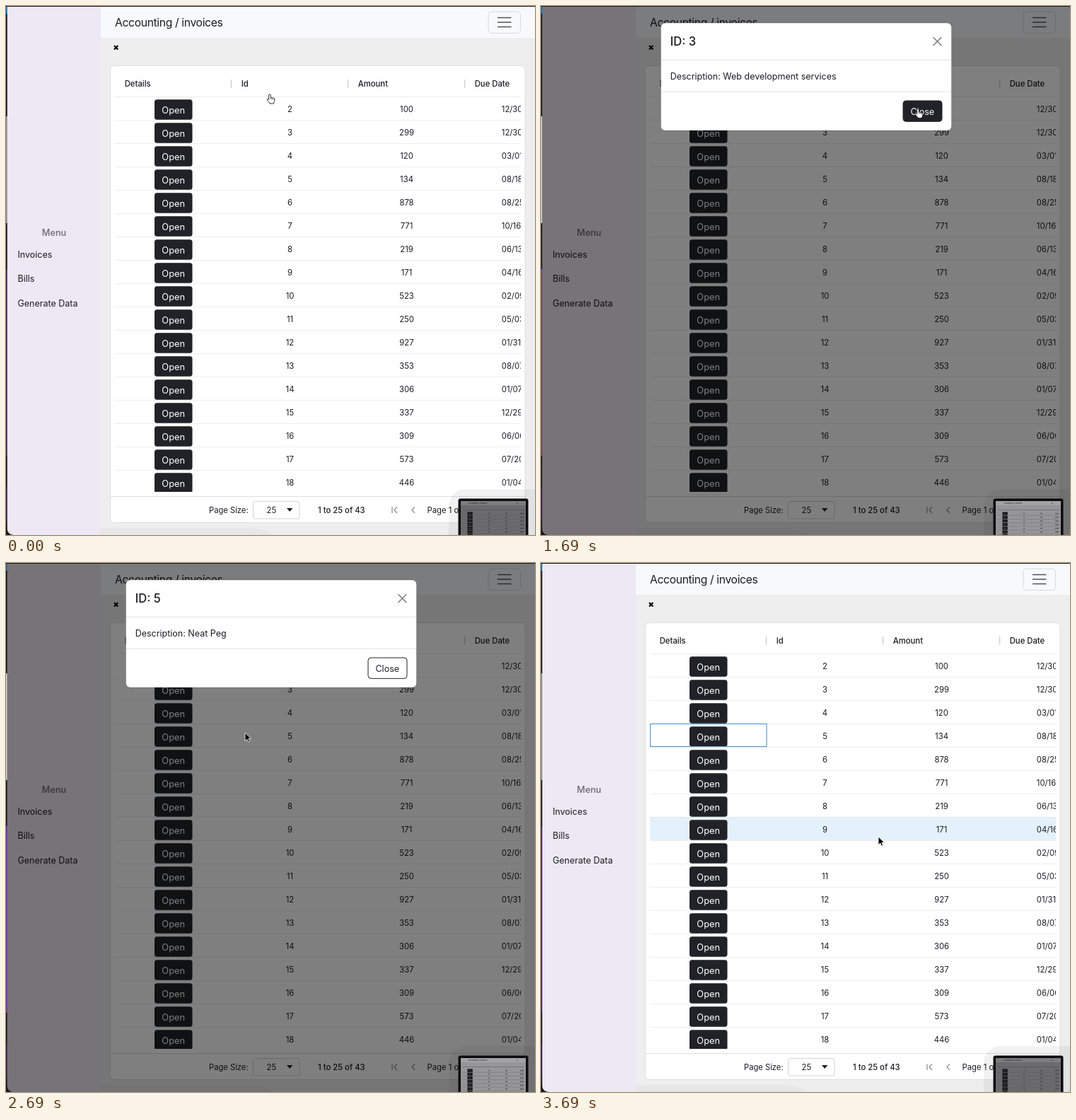
An HTML page for the animation above (3.89 s loop, 748x748 px).

```html
<!DOCTYPE html>
<html lang="en">
<head>
<meta charset="utf-8">
<title>Invoices</title>
<style>
  html, body { margin: 0; width: 100%; height: 100%; overflow: hidden; background: #17171c; }
  svg { display: block; width: 100vw; height: 100vh; font-family: Inter, Roboto, sans-serif; }
</style>
</head>
<body>
<svg id="stage" viewBox="0 0 748 748" xmlns="http://www.w3.org/2000/svg"></svg>
<script>
const LOOP = 3890, TOP = 128, ROW = 33, INK = '#212227';
const $ = id => document.getElementById(id);

const amounts = '100 299 120 134 878 771 219 171 523 250 927 353 306 337 309 573 446'.split(' ');
const dates = '12/30 12/30 03/01 08/18 08/25 10/16 06/13 04/16 02/09 05/03 01/31 08/07 01/07 12/29 06/06 07/20 01/04'.split(' ');

// at: start time, x/y: pointer tip, row/btn/focus: grid row index,
// fade: backdrop and dialog strength, top: dialog offset
const steps = [
  { at: 0, x: 373, y: 125, hand: 1 },
  { at: 100, x: 318, y: 147, row: 0 },
  { at: 290, x: 245, y: 182, hand: 1, row: 1, btn: 1 },
  { at: 490, x: 236, y: 181, hand: 1, row: 1, btn: 1 },
  { at: 690, x: 236, y: 181, hand: 1, row: 1, btn: 1, focus: 1 },
  { at: 890, x: 236, y: 181, hand: 1, row: 1, fade: 1, top: 20, id: 3 },
  { at: 1090, x: 306, y: 182, fade: 1, top: 24, id: 3 },
  { at: 1290, x: 495, y: 154, fade: 1, top: 24, id: 3 },
  { at: 1490, x: 531, y: 146.5, hand: 1, fade: 1, top: 24, id: 3, close: 1 },
  { at: 1690, x: 533, y: 145.5, hand: 1, fade: 1, top: 24, id: 3, close: 1 },
  { at: 1890, x: 533, y: 146, hand: 1, fade: .5, top: 12, id: 3, close: 1 },
  { at: 2090, x: 330, y: 210, row: 2, focus: 1 },
  { at: 2290, x: 248, y: 244.5, hand: 1, row: 3, btn: 3, focus: 3 },
  { at: 2490, x: 247.5, y: 244, row: 3, btn: 3, fade: .7, top: 5, id: 5 },
  { at: 2690, x: 338, y: 240, fade: 1, top: 24, id: 5 },
  { at: 2890, x: 592, y: 152, fade: 1, top: 24, id: 5 },
  { at: 3090, x: 566, y: 144, fade: 1, top: 24, id: 5 },
  { at: 3290, x: 553, y: 146, hand: 1, fade: 1, top: 24, id: 5, close: 1 },
  { at: 3490, x: 553, y: 147, hand: 1, fade: .5, top: 12, id: 5, close: 1 },
  { at: 3690, x: 477, y: 387, row: 7, focus: 3 }
];
const notes = { 3: 'Web development services', 5: 'Neat Peg' };

const rect = (x, y, w, h, fill, more = '') =>
  `<rect x="${x}" y="${y}" width="${w}" height="${h}" fill="${fill}" ${more}/>`;
const path = (d, stroke, width = 1, more = '') =>
  `<path d="${d}" fill="none" stroke="${stroke}" stroke-width="${width}" ${more}/>`;
// y is the middle of the capitals
const text = (x, y, size, str, more = '') =>
  `<text x="${x}" y="${y + size * .365}" font-size="${size}" fill="#1c1d20" ${more}>${str}</text>`;
const MID = 'text-anchor="middle"', MEDIUM = 'font-weight="500"';

function backdropStrip() {
  return rect(0, 0, 748, 748, '#17171c')
    + rect(0, 1, 2, 10, '#1b6fae')
    + rect(0, 156, 3, 151, '#8f8f93', 'id="stripGrey"')
    + rect(0, 372, 3, 264, '#452060', 'id="stripPurple"')
    + rect(0, 680, 3, 48, '#35194a');
}

function shell() {
  return rect(134, 1, 614, 747, '#eeeeee')
    + rect(134, 1, 614, 44, '#f8f9fc')
    + rect(1.5, 1, 132.5, 747, '#ede8f4')
    + '<path d="M134 738H345Q368 739 376 748H134Z" fill="#e7e7e7"/>'
    + text(68, 320, 12.7, 'Menu', MID + ' style="fill:#6d6a73" ' + MEDIUM)
    + ['Invoices', 'Bills', 'Generate Data']
        .map((s, i) => text(16.5, 351.3 + 34.6 * i, 12.5, s)).join('')
    + text(154, 23, 15.7, 'Accounting / invoices', 'letter-spacing="-.36"')
    + rect(682, 8, 45.5, 30.5, 'none', 'rx="5" stroke="#d6d8db"')
    + path('M695 16.5H714.5M695 23H714.5M695 29.5H714.5', '#535457', 1.5)
    + path('M153 56L158.4 61.4M158.4 56L153 61.4', '#000', 2.1);
}

function gridRow(i) {
  const y = TOP + ROW * i, c = y + 18;
  return rect(154, y + .5, 574, ROW, '#fff', `id="row${i}"`)
    + path(`M154 ${y + ROW + .5}H728`, '#dcdddf')
    + rect(210, y + 4.3, 53.5, 28.4, INK, `rx="3.5" id="btn${i}"`)
    + text(236.7, c + 1, 12.8, 'Open', MID + ' style="fill:#fff"')
    + text(401.5, c + .2, 11.3, i + 2, MID)
    + text(566.5, c + .2, 11.3, amounts[i], MID)
    + text(700.8, c + .2, 11.3, dates[i]);
}

function grid() {
  const heads = ['Details', 'Id', 'Amount', 'Due Date']
    .map((s, i) => text(167.7 + 165 * i, 110, 11.3, s, MEDIUM)).join('');
  return rect(147.5, 84.5, 586.5, 646, '#fff', 'rx="6" stroke="#dedee0"')
    + heads
    + path('M318.5 104V115.5M483.5 104V115.5M648.5 104V115.5', '#cfd0d2', 1.5)
    + path('M154 128.5H728', '#d9dadc')
    + `<g clip-path="url(#rows)">${amounts.map((a, i) => gridRow(i)).join('')}`
    + rect(154.5, 0, 164.5, 32, 'none', 'id="focus" stroke="#4c95cf" stroke-width="1.1"') + '</g>'
    + path('M148 693.5H734', '#dedee0')
    + text(287, 713, 11.2, 'Page Size:')
    + rect(349.5, 700.5, 65.5, 24.5, '#fff', 'rx="3" stroke="#d3d4d6"')
    + text(368.5, 713, 11.3, '25')
    + '<path d="M397 710H405.4L401.2 715Z" fill="#1c1d20"/>'
    + text(441, 713, 11.3, '1 to 25 of 43', MEDIUM)
    + path('M546 708.5V717M553 708.5L549 712.7L553 717M578 708.5L574 712.7L578 717', '#8a8b8e', 1.2)
    + text(595.5, 713, 11.3, 'Page 1 of 2');
}

function dialog() {
  return rect(169.5, 0, 411, 152, '#fff', 'rx="6" stroke="#000" stroke-opacity=".2"')
    + path('M170 52.2H580M170 97.2H580', '#dfe1e4')
    + text(182.7, 26, 16.6, '', 'id="title" ' + MEDIUM)
    + path('M554.5 20.2L566.3 32M566.3 20.2L554.5 32', '#7d7d7f', 1.5)
    + text(182.7, 75, 12.5, '', 'id="note"')
    + rect(512, 110, 55, 29.3, '#fff', `id="close" rx="4" stroke="${INK}"`)
    + text(539.3, 125, 12.6, 'Close', 'id="closeText" ' + MID);
}

function thumbnail() {
  let s = rect(626, 683, 150, 100, '#000', 'rx="24" opacity=".05"')
    + rect(639.5, 696.5, 99, 60, '#0c0c0e', 'rx="3"')
    + rect(643, 700, 92, 50, '#6b6b6e', 'id="thumb"')
    + rect(643, 700, 92, 6, '#fff', 'opacity=".12"')
    + text(654, 703, 2.6, 'Accounting / invoices')
    + path('M722 703H724', '#222', .8)
    + path('M646 712.5H732', '#444', .4);
  for (let y = 715.5; y < 748; y += 5.2) {
    s += rect(652.5, y, 7.2, 4.3, '#0e0e10')
      + path(`M654 ${y + 2.2}H658`, '#777', .6)
      + path(`M682 ${y + 2.2}H684M706 ${y + 2.2}H709M727 ${y + 2.2}H732`, '#2c2c2e', .8)
      + path(`M646 ${y + 4.8}H732`, '#505052', .3);
  }
  return s;
}

function pointers() {
  const hand = 'M-1.4 7.2V1.1Q-1.3 -.2 0 -.2Q1.2 -.2 1.3 1.1V4.6Q2.4 3.8 3.3 5Q4.5 4.2 5.2 5.5Q6.8 5.2 6.8 6.9V9Q6.6 10.6 5.6 11.7V13H-.2V12Q-1.8 10.4 -3.8 7.9Q-4.1 6.5 -2.8 6.3Z';
  return '<g id="pointer">'
    + '<path id="arrow" d="M0 0V11.6L2.7 9.1L4.5 13.1L6.5 12.2L4.8 8.3H8.5Z" fill="#000" stroke="#fff" stroke-width=".8"/>'
    + `<g id="hand"><path d="${hand}" fill="#fff" stroke="#1a1a1a" stroke-width=".9" stroke-linejoin="round"/>`
    + path('M1.3 4.6V7M3.3 5V7.2M5.2 5.5V7.4', '#1a1a1a', .7) + '</g></g>';
}

$('stage').innerHTML = `<defs>
  <clipPath id="rows"><rect x="154" y="128" width="574" height="559"/></clipPath>
  <clipPath id="window"><path d="M1.5 1H748V748H12Q1.5 748 1.5 737Z"/></clipPath></defs>`
  + backdropStrip()
  + `<g clip-path="url(#window)">${shell()}${grid()}${rect(0, 0, 748, 748, '#000', 'id="shade"')}</g>`
  + `<g id="dialog">${dialog()}</g>` + thumbnail() + pointers();

const set = (id, name, value) => $(id).setAttribute(name, value);
const show = (id, on) => set(id, 'visibility', on ? 'visible' : 'hidden');

function draw(s) {
  const fade = s.fade || 0;
  amounts.forEach((a, i) => {
    set('row' + i, 'fill', i === s.row ? '#e5f1fa' : '#fff');
    set('btn' + i, 'fill', i === s.btn ? '#3f4044' : INK);
  });
  show('focus', s.focus !== undefined);
  set('focus', 'y', TOP + ROW * (s.focus || 0) + .5);

  set('shade', 'opacity', fade * .5);
  set('dialog', 'opacity', fade);
  set('dialog', 'transform', `translate(0 ${s.top || 0})`);
  if (s.id) {
    $('title').textContent = 'ID: ' + s.id;
    $('note').textContent = 'Description: ' + notes[s.id];
  }
  set('close', 'fill', s.close ? INK : fade < 1 ? 'none' : '#fff');
  set('closeText', 'fill', s.close ? '#fff' : INK);

  set('thumb', 'fill', fade ? '#969698' : '#6b6b6e');
  set('stripGrey', 'fill', fade ? '#d4d4d6' : '#8f8f93');
  set('stripPurple', 'fill', fade ? '#7436a6' : '#452060');

  set('pointer', 'transform', `translate(${s.x} ${s.y})`);
  show('hand', s.hand);
  show('arrow', !s.hand);
}

const start = performance.now();
let current;
function tick() {
  const t = (performance.now() - start) % LOOP;
  const step = steps.findLast(s => s.at <= t);
  if (step !== current) draw(current = step);
  requestAnimationFrame(tick);
}
tick();
</script>
</body>
</html>
```
